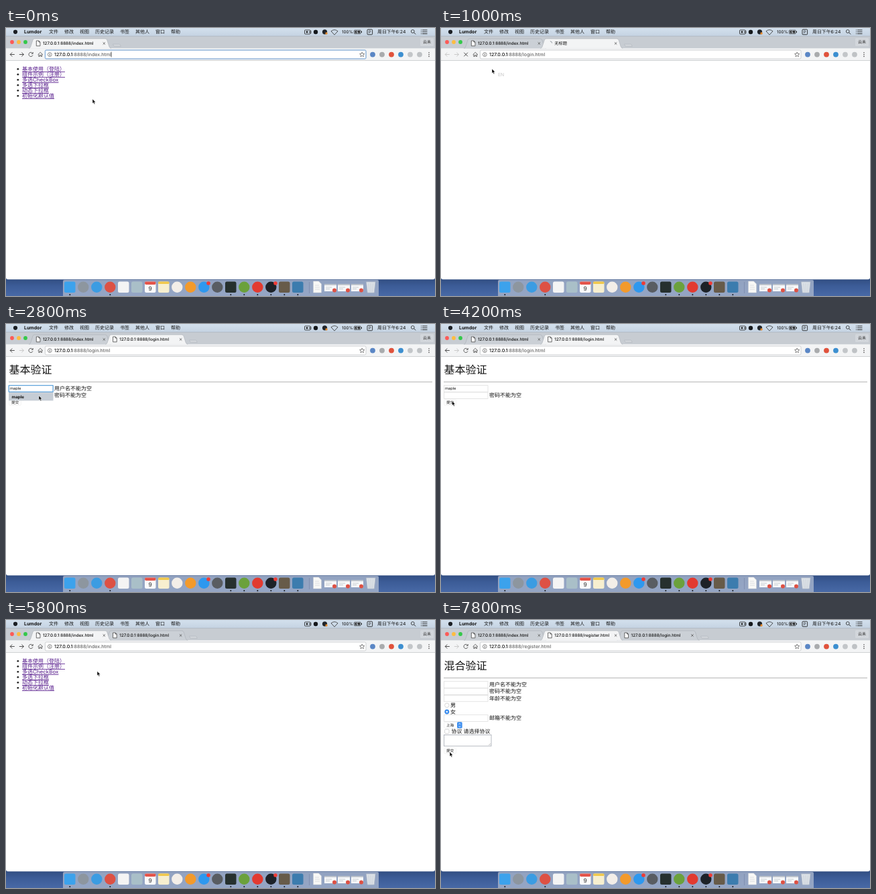
Animation, 640 px wide and 400 px high, one loop 8 s. Source, as an HTML page:

```html
<!DOCTYPE html>
<html lang="zh-CN">
<head>
<meta charset="utf-8">
<title>表单验证</title>
<style>
html, body { margin: 0; width: 100%; height: 100%; overflow: hidden; background: #fff; }
svg { display: block; width: 640px; height: 400px; }
text { font-family: Inter, "Noto Sans CJK SC", "Noto Sans CJK", sans-serif; white-space: pre; text-rendering: geometricPrecision; }
.link { text-decoration: underline; text-decoration-thickness: .6px; text-underline-offset: 1px; }
</style>
</head>
<body>
<svg id="stage" viewBox="0 0 640 400" xmlns="http://www.w3.org/2000/svg"></svg>
<script>
const LOOP = 8000, STEP = 200, HOST = '127.0.0.1';
const stage = document.getElementById('stage');

const text = (x, y, size, str, fill = '#111', extra = '') =>
  `<text x="${x}" y="${y}" font-size="${size}" fill="${fill}" ${extra}>${str}</text>`;
const rect = (x, y, w, h, fill, extra = '') =>
  `<rect x="${x}" y="${y}" width="${w}" height="${h}" fill="${fill}" ${extra}/>`;
const disc = (x, y, r, fill, extra = '') =>
  `<circle cx="${x}" cy="${y}" r="${r}" fill="${fill}" ${extra}/>`;
const line = (d, stroke, width = 1, fill = 'none', extra = '') =>
  `<path d="${d}" fill="${fill}" stroke="${stroke}" stroke-width="${width}" ${extra}/>`;
// Visible while from <= t < to
const during = (from, to, ...parts) =>
  `<g data-from="${from}" data-to="${to}">${parts.join('')}</g>`;

const MEDIUM = 'font-weight="500"', BOLD = 'font-weight="700"';

function menuBar() {
  const items = [[64, '文件'], [87, '修改'], [110, '视图'], [133, '历史记录'], [170, '书签'],
    [193, '其他人'], [223, '窗口'], [246, '帮助']];
  return rect(0, 0, 640, 12, 'url(#menu)') +
    disc(14, 5.8, 3.1, '#1b1f24') +
    text(27, 8.3, 7, 'Lumdor', '#111', BOLD) +
    items.map(([x, s]) => text(x, 8.3, 7, s)).join('') +
    rect(445.5, 3, 8.5, 6, 'none', 'rx="1" stroke="#222" stroke-width=".8"') +
    disc(449, 6, 1.4, '#222') + line('M452 6l3-2v4z', '#222', .6) +
    disc(462, 6, 3.2, '#15181c') + disc(475.5, 5.8, 3.6, '#20242a') + disc(478, 8, 1.7, '#e58a2c') +
    line('M485 4.8Q490 .6 495 4.8L490 10.2Z', '#333', .8) +
    text(501, 8.3, 6.3, '100%') +
    rect(519.3, 3.2, 10, 5.4, 'none', 'rx="1" stroke="#222" stroke-width=".7"') + rect(530, 4.8, 1, 2, '#222') +
    rect(520.5, 4.3, 7.6, 3.2, '#222') + line('M524.800 3.500l-2 2.600h2.200l-1 2.200', '#d5dfe9', .8) +
    rect(539, 2.2, 7.6, 7.6, 'none', 'rx="1" stroke="#222" stroke-width=".9"') +
    text(541, 8.2, 5.8, 'P') +
    text(554, 8.3, 6.9, '周日下午6:24') +
    disc(606.8, 5, 2.4, 'none', 'stroke="#222" stroke-width=".8"') + line('M608.600 6.800l2.600 2.600', '#222', .9) +
    line('M619 3h1m1 0h7.500M619 5.800h1m1 0h7.500M619 8.600h1m1 0h7.500', '#222', .9);
}

const pageIcon = x =>
  line(`M${x} 19h3.600l2 2v5.800h-5.600zM${x + 3.6} 19v2h2`, '#444', .8, '#fff');

function tab(slot, title, active, loading) {
  const x = 34 + slot * 114.3, cx = x + 112.3;
  const shape = `M${x} 30.500Q${x + 2} 30 ${x + 2.7} 28L${x + 6} 18Q${x + 6.7} 16 ${x + 8.5} 16H${x + 114}` +
    `Q${x + 116} 16 ${x + 116.8} 18L${x + 120} 28Q${x + 121} 30 ${x + 123} 30.500`;
  return line(shape, '#a9afb5', .6, active ? '#f3f4f5' : '#cbd0d6') +
    (loading ? line(`M${x + 14.5} 19.800a2.800 2.800 0 0 1 2.800 2.800`, '#8b9299', .9)
             : pageIcon(x + 11.3)) +
    text(x + 21, 25.2, 6.25, title, '#111', MEDIUM) +
    line(`M${cx - 1.7} 21.300l3.400 3.400m0-3.400l-3.400 3.400`, '#555', .8);
}

function browserState(titles, active, page, { loading, back, forward }) {
  const order = titles.map((_, i) => i).filter(i => i !== active).reverse().concat(active);
  const plus = 45.5 + titles.length * 114;
  const ink = on => on ? '#4d4d4d' : '#c9c9c9';
  return line(`M${plus} 24h9q1.300 0 1.800 1l1 2.500h-9q-1.500 0-1.800-1z`, '#b1b6bc', .6, '#d0d4d9') +
    order.map(i => tab(i, titles[i], i === active, loading && i === active)).join('') +
    line('M12.800 39.500H6.200m3-3l-3 3l3 3', ink(back), 1) +
    line('M19.800 39.500h6.600m-3-3l3 3l-3 3', ink(forward), 1) +
    (loading ? line('M34.300 36.700l5.600 5.600m0-5.600l-5.600 5.600', '#4d4d4d', 1)
             : line('M39.700 37.800a3.100 3.100 0 1 0 .300 2.700M40.200 36v2.300h-2.400', '#4d4d4d', .9)) +
    text(72, 42, 7.05, `${HOST}<tspan fill="#666">:8888/${page}</tspan>`, '#111', MEDIUM);
}

function windowFrame() {
  const extensions = ['#5a86c5', '#a9abad', '#e0523c', '#3c8fd0', '#c3c6c9', '#bfc2c5'];
  return rect(0, 300, 640, 75.3, '#fff', 'rx="3"') + rect(0, 12, 640, 340, '#fff') +
    rect(0, 12, 640, 19, '#c7ccd2') +
    line('M0 12.200h640', '#9ba5b0', .5) +
    ['#fc5b57', '#fdbc40', '#34c84a'].map((c, i) => disc(9 + i * 10, 21, 2.9, c)).join('') +
    rect(618, 15, 20, 12, '#d2d6db', 'rx="1.500"') + text(622, 23.3, 6, '云禾', '#222') +
    rect(0, 30.3, 640, 18, '#f3f4f5') + line('M0 48.500h640', '#c6c8ca', .8) +
    rect(58.4, 33, 478.6, 13, '#fff', 'rx="1.800" stroke="#bdc0c3" stroke-width=".7"') +
    line('M47.600 39.700l3.600-3.400l3.600 3.400M48.800 39.200v3.300h1.500v-2h1.800v2h1.500v-3.300', '#4d4d4d', .8) +
    disc(65.3, 39.6, 2.9, 'none', 'stroke="#555" stroke-width=".7"') + line('M65.300 39v2.300m0-3.500v.700', '#444', .8) +
    line('M531.200 36l1 2.400l2.600.200l-2 1.700l.600 2.500l-2.200-1.400l-2.200 1.400l.600-2.500l-2-1.700l2.600-.200z', '#555', .7) +
    extensions.map((c, i) => disc(547 + i * 14, 39.6, 3.9, c)).join('') +
    [36.8, 39.6, 42.4].map(y => disc(631, y, .8, '#555')).join('');
}

function dock() {
  const square = (i, fill) => rect(87 + i * 20, 378.5, 16.5, 16.5, fill, 'rx="2.500"');
  const round = (i, fill) => disc(95.3 + i * 20, 386.8, 8.2, fill);
  const badge = x => disc(x, 381, 2.8, '#ef3b35');
  const apps = [[square, '#3ca2ec'], [round, '#8d969f'], [round, '#3b9ce2'], [round, '#dd5144'],
    [square, '#f4f4f4'], [square, '#a9bfc8'], [square, '#fafafa'], [square, '#f7efcf'],
    [round, '#f3eee8'], [round, '#f39a2b'], [round, '#2e98ee'], [round, '#595d62'],
    [square, '#26302e'], [round, '#6ba13c'], [round, '#e23a30'], [round, '#1d2228'],
    [square, '#675b49'], [square, '#3c7cae']];
  const thumb = x => rect(x, 382, 18, 11, '#f7f8f9') + rect(x, 382, 18, 2, '#bfc5cd') +
    line(`M${x + 2} 387h9m-9 2.500h6`, '#b4b9c0', .7) + disc(x + 15, 391.5, 3, '#dd5144');
  return rect(85, 376, 471, 27, '#a3b1cb', 'rx="2" fill-opacity=".85"') +
    apps.map(([draw, fill], i) => draw(i, fill)).join('') +
    rect(207, 378.5, 16.5, 4.5, '#e4544a', 'rx="2"') +
    text(215.2, 392, 8.5, '9', '#333', 'text-anchor="middle"') +
    rect(227, 378.5, 16.5, 3.5, '#f0c84c', 'rx="1.500"') +
    badge(302) + badge(402) +
    line('M452.500 379v17', '#7484a5', .6) +
    line('M458.500 378h8l4 4v13h-12z', '#c9cdd2', .5, '#f8f8f6') +
    line('M461 384h6m-6 3h7m-7 3h7', '#c7cad0', .6) +
    [475, 495, 515].map(thumb).join('') +
    line('M537.500 379h13.500l-1.800 16h-9.900z', '#b8c0ca', .7, '#dde2e8') +
    line('M541 381l1 13m2.300-13v13m3.300-13l-1 13', '#bcc4cd', .6) +
    [0, 3, 12, 13, 14, 15, 16, 17].map(i => disc(95.3 + i * 20, 398, 1, '#15181d')).join('');
}

function indexPage() {
  const links = ['基本使用（登陆）', '组件示例（注册）', '多选CheckBox', '多选下拉框', '动态下拉框', '初始化默认值'];
  return links.map((label, i) => disc(17.8, 61.3 + i * 8, 1.4, '#222') +
    text(24, 64 + i * 8, 8, label, '#551a8b', 'class="link"')).join('');
}

const heading = title => text(4.5, 74, 16, title, '#111', MEDIUM) + line('M4 86.500h632', '#a2a2a2', .8);
const field = y => rect(4.4, y - 4.8, 65.6, 9.6, '#fff', 'stroke="#d9d9d9" stroke-width=".7"');
const error = (y, label) => text(72, y + 3, 8, label + '不能为空');
const button = y => rect(4.5, y - 4.2, 18, 8.6, '#fff', 'rx="1.500" stroke="#e9e9e9" stroke-width=".5"') +
  text(8, y + 2.1, 5.6, '提交');

function loginPage() {
  return heading('基本验证') + field(96.5) + field(106.7) + button(117) +
    during(1800, 4000, error(96, '用户名')) +
    during(1800, 5200, error(106.2, '密码')) +
    during(2400, 4000, rect(4.2, 91.6, 66, 9.8, '#fff', 'rx=".5" stroke="#5fa4dc" stroke-width="1.300"')) +
    during(2800, 5200, text(6, 98.4, 5.7, 'maple')) +
    during(2600, 3000, rect(4, 102.2, 66.5, 12.2, '#c6cdd5'), text(8.5, 110.7, 6.2, 'maple', '#111', BOLD));
}

function registerPage() {
  const radio = (y, label) => disc(8.8, y, 3.2, '#fff', 'stroke="#c4c4c4" stroke-width=".7"') + text(14, y + 2.6, 8, label);
  return heading('混合验证') + [96.5, 106.7, 117, 146.5].map(field).join('') +
    radio(127.3, '男') + radio(137, '女') + disc(8.8, 137, 3.4, '#3d8ff0') + disc(8.8, 137, 1.2, '#fff') +
    rect(4.5, 152.4, 27, 9, '#fff', 'rx="1.500" stroke="#e4e4e4" stroke-width=".5"') +
    text(8, 159, 5.6, '上海') + rect(24, 152.3, 7.6, 9.2, '#3d8ff0', 'rx="1.500"') +
    line('M26.300 156l1.500-1.700l1.500 1.700m-3 2l1.500 1.700l1.500-1.700', '#fff', .8) +
    rect(5.6, 163.2, 6.4, 6.2, '#fff', 'rx="1.200" stroke="#c4c4c4" stroke-width=".7"') +
    text(15.5, 168.8, 8, '协议') +
    rect(4.4, 171.5, 70.6, 16.6, '#fff', 'stroke="#a3a9b2" stroke-width=".8"') +
    line('M71 187l3-3m-1.300 3l1.300-1.300', '#999', .5) + button(195) +
    during(7600, 8000, error(96, '用户名'), error(106.2, '密码'), error(116.7, '年龄'),
      error(146.2, '邮箱'), text(33.5, 168.8, 8, '请选择协议'));
}

const INDEX = `${HOST}:8888/index.html`, LOGIN = `${HOST}:8888/login.html`;
const REGISTER = `${HOST}:8888/register.html`, BLANK = '无标题';

stage.innerHTML = `
  <defs>
    <linearGradient id="menu" x2="0" y2="1"><stop stop-color="#d3e0ed"/><stop offset="1" stop-color="#c5d3e2"/></linearGradient>
    <linearGradient id="desk" x2="0" y2="1"><stop stop-color="#2d4878"/><stop offset=".5" stop-color="#3c5c97"/><stop offset="1" stop-color="#4869a6"/></linearGradient>
  </defs>` +
  rect(0, 370, 640, 30, 'url(#desk)') + menuBar() + windowFrame() + dock() +
  during(0, 800, rect(58.4, 33, 478.6, 13, '#fff0', 'rx="1.500" stroke="#72a5dc" stroke-width="1"')) +
  during(0, 800, browserState([INDEX], 0, 'index.html', { back: true, forward: true }), indexPage()) +
  during(0, 400, line('M157 35.500v8', '#222', .7)) +
  during(800, 1200, browserState([INDEX, BLANK], 1, 'login.html', { loading: true }),
    text(85, 71.5, 6.8, 'EN', '#c4c4c4')) +
  during(1200, 5200, browserState([INDEX, LOGIN], 1, 'login.html', { back: true }), loginPage()) +
  during(5200, 6400, browserState([INDEX, LOGIN], 0, 'index.html', { back: true, forward: true }), indexPage()) +
  during(6400, 6600, browserState([INDEX, BLANK, LOGIN], 1, 'register.html', { loading: true })) +
  during(6600, 8000, browserState([INDEX, REGISTER, LOGIN], 1, 'register.html', { back: true }), registerPage()) +
  line('M0 0v6.600l1.500-1.400l1.100 2.600l1.200-.500l-1.100-2.500h2.100z', '#fff', .5, '#000', 'id="cursor"');

const cursor = document.getElementById('cursor');
const timed = [...stage.querySelectorAll('[data-from]')];
// time, x, y
const path = [[0, 129, 106], [600, 72, 61], [1000, 76, 61], [1600, 15.5, 117.5], [2000, 15.5, 117.5],
  [2400, 42, 97], [2800, 49, 107], [3000, 49, 107], [3800, 16.5, 115], [4400, 16.5, 115], [5200, 92, 24],
  [5400, 96, 26], [5800, 136, 76.5], [6200, 68, 69], [6600, 68, 69], [7400, 13, 194], [7600, 13, 197], [8000, 13, 197]];

function cursorAt(t) {
  const i = path.findIndex(p => p[0] > t);
  const [t0, x0, y0] = path[i - 1], [t1, x1, y1] = path[i];
  const u = (t - t0) / (t1 - t0), ease = u * u * (3 - 2 * u);
  return [x0 + (x1 - x0) * ease, y0 + (y1 - y0) * ease];
}

function render(now) {
  const t = Math.floor(now % LOOP / STEP) * STEP;
  for (const el of timed)
    el.style.display = t >= +el.dataset.from && t < +el.dataset.to ? '' : 'none';
  cursor.setAttribute('transform', `translate(${cursorAt(t)})`);
}

const start = performance.now();
function tick() {
  render(performance.now() - start);
  requestAnimationFrame(tick);
}
tick();
</script>
</body>
</html>
```
